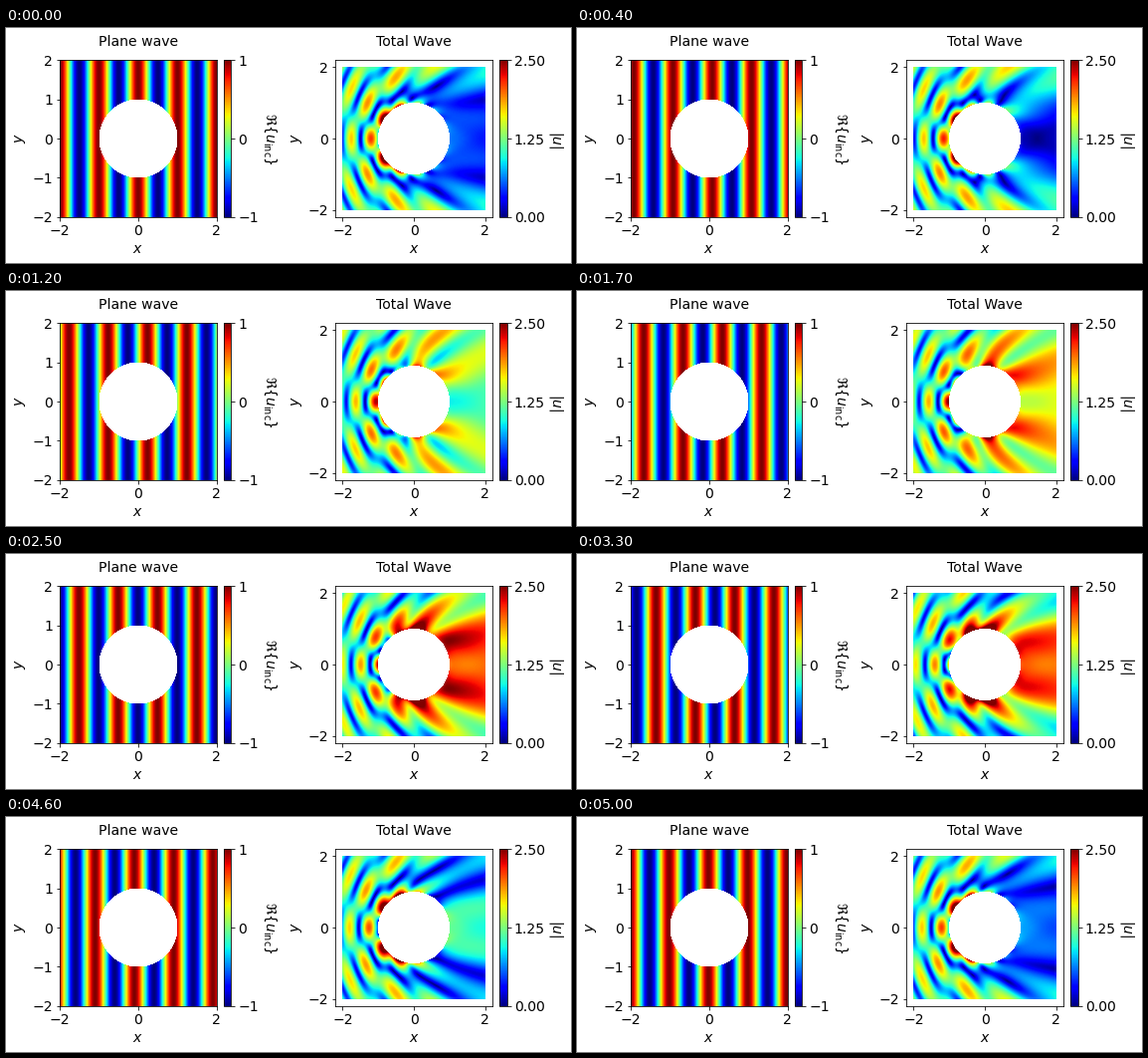
Write a matplotlib script that moves like this. It is 568 px wide and 236 px high and loops after 5.1 s.

```python
import numpy as np
import matplotlib.pyplot as plt
from matplotlib.animation import FuncAnimation

W, H, DPI = 568, 236, 72
STEPS = 51
K = 2 * np.pi
ORDERS = 18

plt.rcParams.update({"font.family": "DejaVu Sans", "font.size": 14})


def hankel_table(x, count):
    """Hankel functions of the first kind, orders 0..count-1, one row each."""
    x = np.atleast_1d(x)
    th = (np.arange(400) + 0.5) * np.pi / 400
    t = (np.arange(1500) + 0.5) * 6 / 1500
    arg = np.outer(x, np.sin(th))
    decay = np.exp(-np.outer(x, np.sinh(t)))
    j = np.array([np.cos(n * th - arg).mean(1) for n in range(count)])
    y = []
    for n in range(2):
        tail = decay @ (np.exp(n * t) + (-1) ** n * np.exp(-n * t)) * 6 / 1500
        y.append(np.sin(arg - n * th).mean(1) - tail / np.pi)
    for n in range(1, count - 1):
        y.append(2 * n / x * y[n] - y[n - 1])
    return j + 1j * np.array(y)


def scattered(x, y):
    """Layer potential of the unit disc whose mean on the rim cancels the plane wave."""
    r, th = np.hypot(x, y), np.arctan2(y, x)
    rs = np.linspace(0.97, 2.9, 500)
    table = hankel_table(K * rs, ORDERS)
    edge = hankel_table(K, ORDERS + 1)[:, 0]
    total = np.zeros(r.shape, complex)
    for n in range(ORDERS):
        h = edge[n]
        dh = n / K * h - edge[n + 1]
        amp = -2 * h.real * dh.real / (dh * h.real + h * dh.real)
        mode = np.interp(r, rs, table[n].real) + 1j * np.interp(r, rs, table[n].imag)
        total += (2 if n else 1) * 1j ** n * amp * mode * np.cos(n * th)
    return total


def grid(size):
    c = -2 + (np.arange(size) + 0.5) * 4 / size
    x, y = np.meshgrid(c, c)
    return x, y, np.hypot(x, y) < 1


def add_axes(x, y, w, h):
    return fig.add_axes([x / W, 1 - (y + h) / H, w / W, h / H])


def side_label(x, text):
    fig.text(x / W, 1 - 112 / H, text, rotation=270, ha="center", va="center")


def panel(left, title, data, low, high):
    ax = add_axes(left, 32.3, 157.6, 157.6)
    im = ax.imshow(data, cmap="jet", origin="lower", extent=(-2, 2, -2, 2),
                   interpolation="nearest", vmin=low, vmax=high)
    ax.set_title(title, fontsize=14, pad=14)
    ax.set_xlabel("$x$")
    ax.set_ylabel("$y$")
    ax.set_xticks([-2, 0, 2])
    bar = fig.colorbar(im, cax=add_axes(left + 164.6, 32.3, 7.8, 157.6),
                       ticks=[low, (low + high) / 2, high])
    return ax, im, bar


fig = plt.figure(figsize=(W / DPI, H / DPI), dpi=DPI, facecolor="white")

xl, yl, hole_l = grid(158)
xr, yr, hole_r = grid(144)
sc = scattered(xr, yr)


def plane(phase):
    return np.ma.array(np.cos(K * xl - phase), mask=hole_l)


def total(phase):
    return np.ma.array(np.abs(np.exp(1j * (K * xr - phase)) + sc), mask=hole_r)


ax1, im1, bar1 = panel(54, "Plane wave", plane(0), -1, 1)
ax1.set_yticks(range(-2, 3))
bar1.ax.set_yticklabels(["\u22121", "0", "1"])
side_label(265.5, r"$\Re\{u_{\mathrm{inc}}\}$")

ax2, im2, bar2 = panel(331.3, "Total Wave", total(0), 0, 2.5)
ax2.set(xlim=(-2.2, 2.2), ylim=(-2.2, 2.2), yticks=[-2, 0, 2])
bar2.ax.set_yticklabels(["0.00", "1.25", "2.50"])
side_label(553, "$|u|$")


def draw(i):
    phase = 2 * np.pi * i / STEPS
    im1.set_data(plane(phase))
    im2.set_data(total(phase))
    return im1, im2


anim = FuncAnimation(fig, draw, frames=STEPS, interval=100, repeat=True, repeat_delay=0)
plt.show()
```
